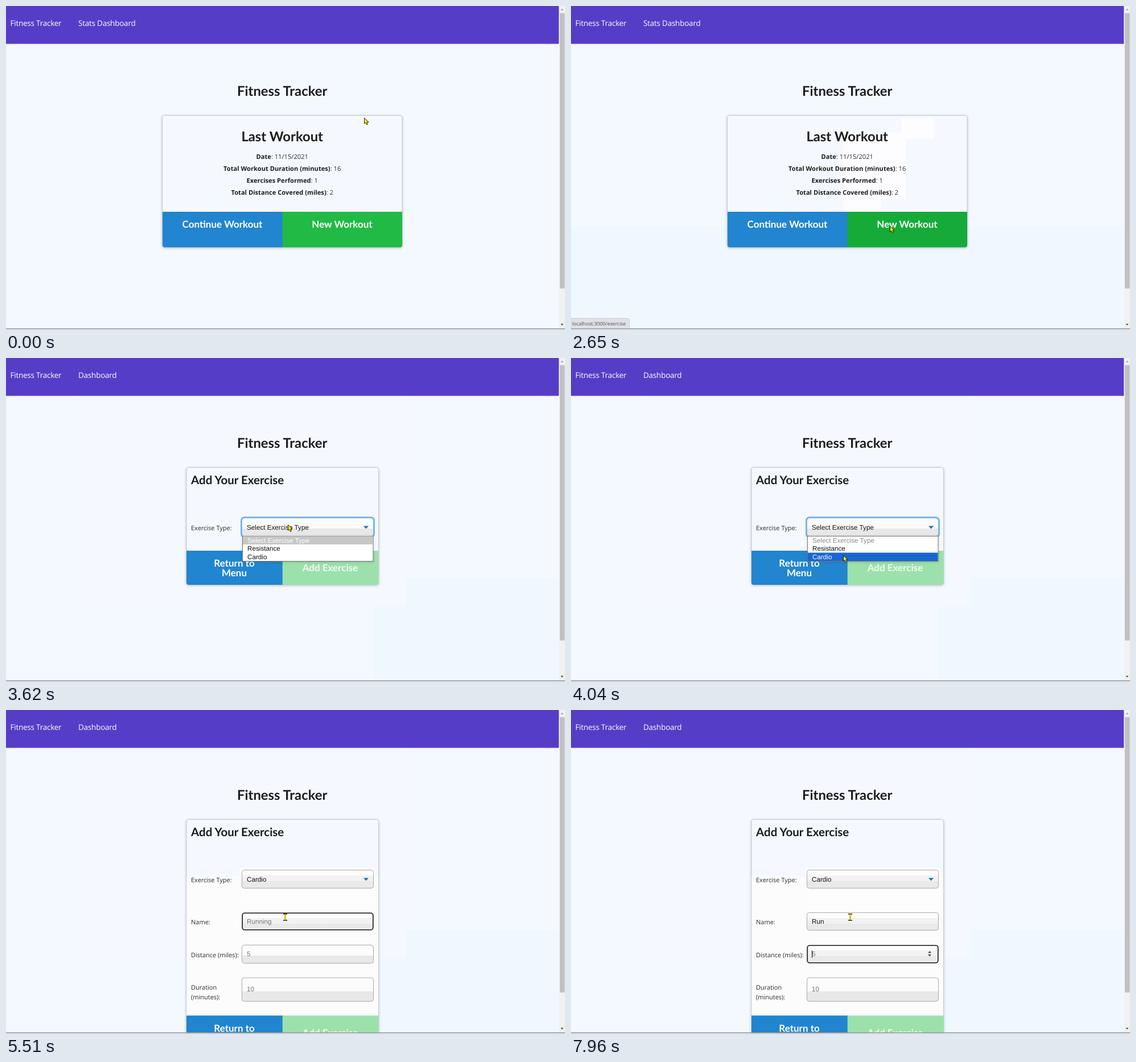
An HTML page for the animation above (8 s loop, 982x570 px).

```html
<!DOCTYPE html>
<html lang="en">
<head>
<meta charset="utf-8">
<title>Fitness Tracker</title>
<style>
  html, body { margin: 0; width: 100%; height: 100%; overflow: hidden; background: #f4f8ff; }
  svg { display: block; width: 100%; height: 100%; }
  text { text-rendering: geometricPrecision; white-space: pre; }
  .nav { font: 13.45px "Open Sans", "Noto Sans", sans-serif; letter-spacing: -.2px; fill: #fff; }
  .body { font: 11.15px "Open Sans", "Noto Sans", sans-serif; fill: #2a2c2f; }
  .body tspan { font-weight: 700; fill: #1c1d1f; }
  .label { font-size: 11px; }
  .status { font: 8.7px "Open Sans", "Noto Sans", sans-serif; fill: #4a4d52; }
  .h1 { font: 700 23.8px Lato, sans-serif; fill: #1b1c1d; }
  .h2 { font: 700 20.5px Lato, sans-serif; fill: #1b1c1d; }
  .btn { font: 700 17px Lato, sans-serif; fill: #fff; }
  .input { font: 11.7px "Liberation Sans", Arial, sans-serif; fill: #111; }
  .hint { fill: #757575; }
  .mid { text-anchor: middle; }
  .card { filter: drop-shadow(0 1px 2px rgba(60, 75, 100, .3)); }
</style>
</head>
<body>
<svg id="stage" viewBox="0 0 982 570">
  <defs>
    <linearGradient id="hard" x2="0" y2="1">
      <stop offset=".59" stop-color="#fcfcfd"/><stop offset=".59" stop-color="#e8e8e8"/>
    </linearGradient>
    <linearGradient id="soft" x2="0" y2="1">
      <stop offset=".3" stop-color="#fdfdfd"/><stop offset=".3" stop-color="#f3f3f3"/>
      <stop offset=".62" stop-color="#f1f1f1"/><stop offset=".62" stop-color="#e9e9e9"/>
    </linearGradient>
  </defs>
</svg>
<script>
const LOOP = 8000;
const FORM = 2800, OPEN = 3620, PICK = 4410, NAME = 4950, DIST = 7030;
const stage = document.getElementById('stage');
const timed = [];
const CX = 485.2, BLUE = '#2185d0', PALE = '#9ce1ab';

function add(parent, tag, attrs, content) {
  const el = document.createElementNS('http://www.w3.org/2000/svg', tag);
  for (const k in attrs) el.setAttribute(k, attrs[k]);
  if (content) el.innerHTML = content;
  parent.appendChild(el);
  return el;
}
const rect = (p, x, y, width, height, fill, more) =>
  add(p, 'rect', { x, y, width, height, fill, ...more });
const text = (p, cls, x, y, str, more) => add(p, 'text', { class: cls, x, y, ...more }, str);
const path = (p, d, fill, more) => add(p, 'path', { d, fill, ...more });

// A group that is visible only from a until b
function span(a, b, parent = stage) {
  const el = add(parent, 'g');
  timed.push([el, a, b]);
  return el;
}

function card(p, x, y, w, h) {
  rect(p, x, y, w, h, '#f5f9ff', { rx: 4, stroke: '#c3c8cf', class: 'card' });
}

function buttons(p, x, y, w, h, right) {
  const half = w / 2, r = 4;
  path(p, `M${x} ${y}h${half + .5}v${h}h${r - half - .5}q${-r} 0 ${-r} ${-r}z`, BLUE);
  return path(p, `M${x + half} ${y}h${half}v${h - r}q0 ${r} ${-r} ${r}h${r - half}z`, right);
}

// Background tints
const tint = (a, b, x, y, w, h) => rect(span(a, b), x, y, w, h, '#f0f8ff');
tint(1020, 2650, 0, 390, 568, 177);
tint(2650, 2950, 0, 387, 972, 180);
tint(2950, LOOP, 646, 387, 326, 180);
rect(span(FORM, LOOP), 127, 67, 577, 370, '#f5f8fe');

// Navigation
rect(stage, 0, 0, 971.5, 66.6, '#563dc8');
text(stage, 'nav', 7.5, 35, 'Fitness Tracker');
text(span(0, FORM), 'nav', 127, 35, 'Stats Dashboard');
text(span(FORM, LOOP), 'nav', 127, 35, 'Dashboard');
text(stage, 'h1 mid', CX, 158, 'Fitness Tracker');

// Last workout page
const home = span(0, FORM);
card(home, 274.5, 192.5, 421.5, 232);
rect(span(720, FORM, home), 581, 197, 56, 36, '#fdfdff');
rect(span(870, FORM, home), 478, 223, 110, 116, '#fdfdff');
rect(span(1020, FORM, home), 478, 339, 66, 23, '#fdfdff');
text(home, 'h1 mid', CX, 238.3, 'Last Workout');
[['Date', '11/15/2021'], ['Total Workout Duration (minutes)', 16],
 ['Exercises Performed', 1], ['Total Distance Covered (miles)', 2]]
  .forEach(([k, v], i) => text(home, 'body mid', CX, 269.2 + 21 * i, `<tspan>${k}</tspan>: ${v}`));
const start = buttons(home, 275, 362, 421, 62.5, '#21ba45');
text(home, 'btn mid', 380, 389.6, 'Continue Workout');
text(home, 'btn mid', 590.5, 389.6, 'New Workout');

// Exercise form
function formPage(a, b, shift) {
  const p = span(a, b);
  card(p, 317, 192.5, 337.5, 206.5 + shift);
  if (shift) rect(p, 317.5, 293, 336.5, 245, '#fcfcfc');
  text(p, 'h2', 325, 222.3, 'Add Your Exercise');
  const f = add(p, 'g', { transform: `translate(0 ${shift})` });
  buttons(f, 317, 339, 337.5, 60, PALE);
  text(f, 'btn mid', 401, 367, 'Return to');
  text(f, 'btn mid', 401, 383.5, 'Menu');
  text(f, 'btn mid', 569.5, 375, 'Add Exercise', { opacity: .85 });
  return p;
}
formPage(FORM, PICK, 0);
const long = formPage(PICK, LOOP, 198.6);
rect(span(OPEN, LOOP), 412, 278, 236, 61, '#fdfdfd');
const form = span(FORM, LOOP);

function field(p, y, h, fill, stroke = '#a9a9a9', width = 1, inset = 0) {
  const d = width / 2 + inset;
  rect(p, 414 + d, y + d, 232 - 2 * d, h - 2 * d, `url(#${fill})`,
    { rx: 4, stroke, 'stroke-width': width });
}
const focused = (p, y, h) => field(p, y, h, 'soft', '#141414', 1.6, .4);

text(form, 'body label', 325, 303, 'Exercise Type:');
field(span(FORM, NAME, form), 281, 33, 'hard');
field(span(NAME, LOOP, form), 281, 33, 'soft');
rect(span(OPEN, NAME, form), 413.5, 280.5, 233, 34.5, 'none',
  { rx: 5, stroke: '#78b4ef', 'stroke-width': 3 });
text(span(FORM, PICK, form), 'input', 423, 301.6, 'Select Exercise Type');
text(span(PICK, LOOP, form), 'input', 423, 301.6, 'Cardio');
path(form, 'M628 295.5h9l-4.5 5z', '#0a78bd');

text(long, 'body label', 325, 377.4, 'Name:');
text(long, 'body label', 325, 434.8, 'Distance (miles):');
text(long, 'body label', 325, 491.8, 'Duration');
text(long, 'body label', 325, 508.8, '(minutes):');

field(span(PICK, NAME, long), 356, 32, 'hard');
focused(span(NAME, DIST, long), 356, 32);
field(span(DIST, LOOP, long), 356, 32, 'soft');
field(span(PICK, DIST, long), 413, 33, 'hard');
const dist = span(DIST, LOOP, long);
focused(dist, 413, 33);
path(dist, 'M627 427.5l3-3.5 3 3.5zM627 430l3 3.5 3-3.5z', '#444');
field(long, 470.5, 42.5, 'hard');

text(span(PICK, 6320, long), 'input hint', 423, 375.8, 'Running');
[['R', 6320, 6600], ['Ru', 6600, 6750], ['Run', 6750, LOOP]]
  .forEach(([s, a, b]) => text(span(a, b, long), 'input', 423, 375.8, s));
text(long, 'input hint', 423, 432.8, '5');
text(long, 'input hint', 423, 495.2, '10');

// Text carets: x, y, from, until
[[423, 365, NAME, 5510], [423, 365, 6040, 6320], [431.5, 365, 6320, 6600],
 [438, 365, 6600, 6750], [445, 365, 6750, DIST],
 [423, 423, DIST, 7430], [423, 423, 7960, LOOP]]
  .forEach(([x, y, a, b]) => rect(span(a, b, long), x, y, 1, 13, '#111'));

// Dropdown list
const list = span(OPEN, PICK);
rect(list, 415.5, 313.5, 229.5, 44, '#fff', { stroke: '#767676', class: 'card' });
const rowTop = i => 313.5 + 14.5 * i;
const options = ['Select Exercise Type', 'Resistance', 'Cardio'];
[[OPEN, 3890, 0, '#c7c7c7'], [3890, 4040, 1, '#1967d2'], [4040, PICK, 2, '#1967d2']]
  .forEach(([a, b, row, color]) => {
    const g = span(a, b, list);
    rect(g, 416, rowTop(row), 228.5, 14.5, color);
    options.forEach((s, i) => text(g, 'input', 424, rowTop(i) + 11,
      s, { style: `fill:${i === row ? '#fff' : i ? '#111' : '#8a8a8a'}` }));
  });

// Browser frame
const status = add(stage, 'g');
path(status, 'M0 549.5h99.5q3 0 3 3v15H0z', '#dee1e6', { stroke: '#c8ccd1' });
text(status, 'status', 2, 561.6, 'localhost:3000/exercise');
rect(stage, 971.5, 0, 10.5, 568, '#f1f1f1');
rect(stage, 973, 12.5, 8.5, 484.5, '#c1c1c1');
path(stage, 'M974.5 7.5h5l-2.5-3z', '#a3a3a3');
path(stage, 'M974.5 559h5l-2.5 3z', '#505050');
rect(stage, 0, 567, 982, 1.5, '#8f9194');
rect(stage, 0, 568.5, 982, 1.5, '#d9dbde');

// Pointers, each with its hot spot at 0,0
const yellow = '#ffee00', ink = { stroke: '#111', 'stroke-width': .9, 'stroke-linejoin': 'round' };
const pointers = { arrow: add(stage, 'g'), hand: add(stage, 'g'), beam: add(stage, 'g') };
path(pointers.arrow, 'M.5 .5V10.5L2.8 8.4 4.6 12.4 6.6 11.6 4.9 7.8H8.2z', yellow, ink);
path(pointers.hand, 'M-1 1q1-1.5 2 0V5L5 5.7 6 7V9.5L4.5 12H-.5L-3.5 8V6.5L-1 7.5z', '#ffd400', ink);
path(pointers.beam, 'M-3.5 -5.5H3.5M0 -5.5V5.5M-3.5 5.5H3.5', 'none', { stroke: '#55520c', 'stroke-width': 2 });
path(pointers.beam, 'M0 -5V5', 'none', { stroke: '#e6da00', 'stroke-width': 2 });

const moves = [
  [0, 'arrow', 629, 196.5], [720, 'arrow', 580, 222], [870, 'beam', 481, 333.5],
  [1020, 'hand', 539, 375], [1140, 'hand', 614, 386], [1260, 'hand', 586, 391],
  [1380, 'hand', 561, 387], [2650, 'arrow', 560, 387], [2950, 'arrow', 527, 326],
  [3070, 'arrow', 493, 285], [3370, 'arrow', 495, 293], [3740, 'arrow', 490, 314],
  [3890, 'arrow', 481, 340], [4040, 'arrow', 478, 347], [4560, 'arrow', 482, 339],
  [4710, 'arrow', 486, 347], [4830, 'beam', 490.5, 364.5]
];
const statusSteps = [[0, 0], [1380, .25], [1530, 1], [2950, .8], [3070, .2], [3220, 0]];
const hoverSteps = [[0, '#21ba45'], [1020, '#1cb340'], [1140, '#16ab39']];

const at = (steps, t) => steps.findLast(s => s[0] <= t);

function draw(t) {
  for (const [el, a, b] of timed) el.style.display = t >= a && t < b ? '' : 'none';
  status.setAttribute('opacity', at(statusSteps, t)[1]);
  start.setAttribute('fill', at(hoverSteps, t)[1]);
  const [, shape, x, y] = at(moves, t);
  for (const k in pointers) pointers[k].style.display = k === shape ? '' : 'none';
  pointers[shape].setAttribute('transform', `translate(${x} ${y})`);
}

const began = performance.now();
function tick() {
  draw((performance.now() - began) % LOOP);
  requestAnimationFrame(tick);
}
tick();
</script>
</body>
</html>
```
